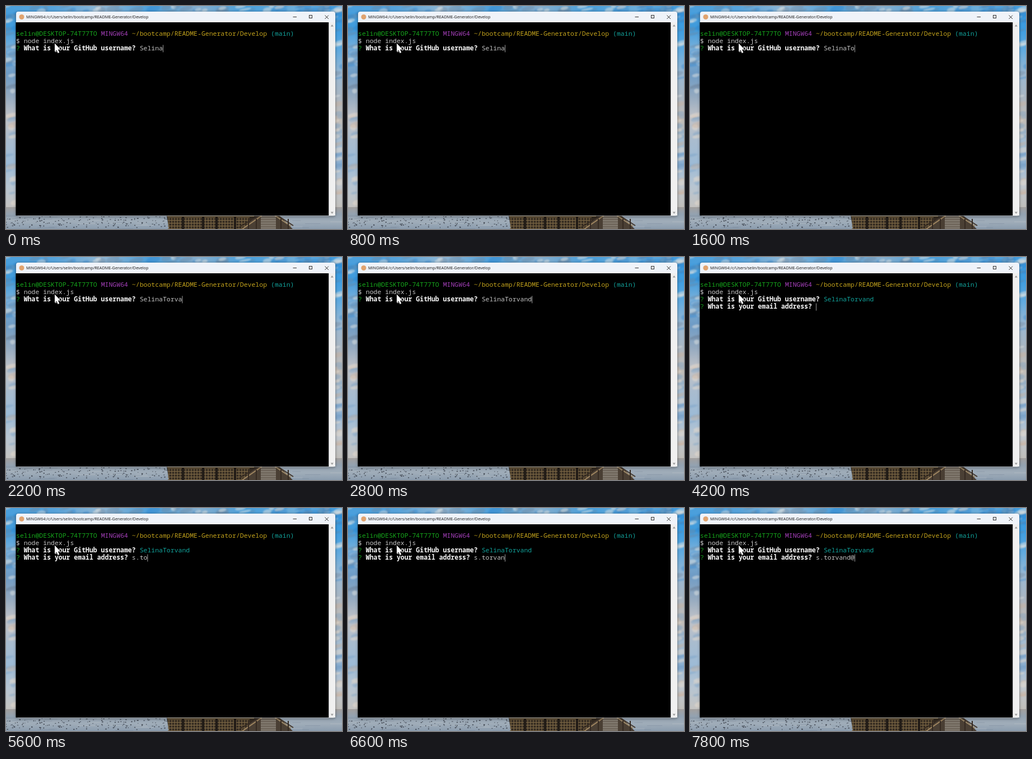
Write an HTML page with a canvas that moves like this. It is 600 by 397 pixels and loops after 8 s.

```html
<!DOCTYPE html>
<html lang="en">
<head>
<meta charset="utf-8">
<title>Terminal prompt</title>
<style>
  html, body { margin: 0; width: 100%; height: 100%; overflow: hidden; }
  canvas { display: block; }
</style>
</head>
<body>
<canvas id="stage" width="600" height="397"></canvas>
<script>
const ctx = document.getElementById('stage').getContext('2d');
const LOOP = 8000, STEP = 200;
const CELL = 6.895, LEFT = 18, BASELINE = 53, LINE = 13.15;
const GREEN = '#16a51c', PURPLE = '#a33fb8', YELLOW = '#c2a21c', CYAN = '#12a39c';
const GRAY = '#c4c4c4', WHITE = '#fafafa';

const USERNAME = 'SelinaTorvand', EMAIL = 's.torvand@';
const TYPED_BEFORE = 6;
const usernameKeys = [1000, 1400, 1800, 2000, 2200, 2400, 2600];
const ENTER = 3200;
const emailKeys = [4600, 4800, 5200, 5400, 5800, 6200, 6400, 6600, 7000, 7600];

let seed = 7;
function random() {
  seed = (seed * 16807) % 2147483647;
  return seed / 2147483647;
}

function rect(color, x, y, w, h) {
  ctx.fillStyle = color;
  ctx.fillRect(x, y, w, h);
}

function polygon(color, ...points) {
  ctx.fillStyle = color;
  ctx.beginPath();
  for (const [x, y] of points) ctx.lineTo(x, y);
  ctx.closePath();
  ctx.fill();
}

function line(color, width, ...points) {
  ctx.strokeStyle = color;
  ctx.lineWidth = width;
  ctx.beginPath();
  points.forEach(([x, y], i) => i ? ctx.lineTo(x, y) : ctx.moveTo(x, y));
  ctx.stroke();
}

function gradient(x0, y0, x1, y1, colors) {
  const g = ctx.createLinearGradient(x0, y0, x1, y1);
  colors.forEach((c, i) => g.addColorStop(i / (colors.length - 1), c));
  return g;
}

function drawSky() {
  rect(gradient(0, 0, 0, 360,
    ['#4a9fdc', '#3f9bdc', '#7fb2da', '#6f9cc6', '#93a9c0', '#c3c4c8', '#a9bccf', '#9dbbd6', '#b7c5d2', '#c5c3c0']), 0, 0, 300, 360);
  rect(gradient(0, 0, 0, 360,
    ['#3d9ade', '#3c9ce0', '#62abdf', '#9ab8d2', '#a9b6c3', '#c5bdb5', '#a5bdd2', '#9ab9d6', '#c1c8cf', '#c0beba']), 300, 0, 300, 360);
  rect(gradient(0, 0, 600, 0,
    ['#4a9fdc', '#55a2da', '#8fb6d4', '#4c9fda', '#86aecd', '#479edb', '#6badda', '#3d9ade']), 0, 0, 600, 11);

  const upper = ['rgba(226,228,226,.5)', 'rgba(40,130,205,.35)', 'rgba(110,130,152,.35)'];
  const lower = ['rgba(232,220,206,.5)', 'rgba(110,155,198,.35)', 'rgba(205,176,150,.35)'];
  ctx.save();
  ctx.filter = 'blur(1.2px)';
  for (let i = 0; i < 130; i++) {
    const side = Math.floor(random() * 3);
    const x = side === 0 ? random() * 18 : side === 1 ? 586 + random() * 14 : random() * 600;
    const y = side === 2 ? random() * 10 : random() * 352;
    ctx.fillStyle = (y > 170 ? lower : upper)[i % 3];
    ctx.beginPath();
    ctx.ellipse(x, y, 4 + random() * 9, 1.5 + random() * 4, -0.2, 0, 7);
    ctx.fill();
  }
  ctx.restore();
}

function drawShore() {
  rect(gradient(0, 358, 0, 397, ['#a3a09e', '#93a2b1', '#a0adb9', '#8b9cae']), 0, 358, 600, 39);
  for (let i = 0; i < 70; i++) {
    const tone = i % 2 ? 'rgba(205,207,208,.3)' : 'rgba(95,112,132,.25)';
    rect(tone, random() * 600 - 20, 362 + random() * 35, 10 + random() * 30, 1);
  }
  for (let i = 0; i < 150; i++) {
    rect('rgba(47,52,62,.8)', random() * 288, 374 + random() * 20, 1 + random() * 1.6, 0.8 + random());
  }
}

function drawPier() {
  polygon('#332a20', [287, 373], [450, 373], [436, 397], [291, 397]);
  for (let x = 290; x < 434; x += 5) rect('rgba(138,114,74,.5)', x, 377, 2, 20);
  for (let y = 376; y < 397; y += 5) rect('#786444', 289, y, 146, 1.3);
  for (const x of [314, 350, 374, 407]) rect('#221c17', x, 375, 4, 22);
  rect('#85724f', 288, 373, 155, 2);

  polygon('#4a3f34', [448, 373], [488, 373], [512, 397], [421, 397]);
  for (let y = 375; y < 397; y += 3) rect('#aaa59b', 455, y, 27, 1.4);
  line('#a08660', 2, [457, 373], [422, 397]);
  line('#352a22', 2, [451, 373], [416, 394]);
  line('#a08a68', 2, [480, 373], [509, 392]);
  line('#43372c', 2, [485, 373], [513, 391]);
  for (const x of [432, 446, 490, 503]) rect('#352a22', x, 379, 2, 18);
}

function drawWindow() {
  ctx.save();
  ctx.shadowColor = 'rgba(0,0,0,.45)';
  ctx.shadowBlur = 5;
  ctx.shadowOffsetY = 1;
  ctx.fillStyle = '#eff3f9';
  ctx.beginPath();
  ctx.roundRect(18, 10, 570, 363.5, 4);
  ctx.fill();
  ctx.restore();

  rect('#000', 17.5, 29, 559, 344);
  rect('#f0f0f0', 576.5, 29, 11.5, 344);
  polygon('#9a9a9a', [579.8, 36.5], [584.8, 36.5], [582.3, 33]);
  polygon('#9a9a9a', [579.8, 366.5], [584.8, 366.5], [582.3, 370]);

  ctx.fillStyle = '#e0a36f';
  ctx.beginPath();
  ctx.arc(28, 19.5, 4.5, 0, 7);
  ctx.fill();
  ctx.font = '7.25px "Open Sans", sans-serif';
  ctx.fillStyle = '#111';
  ctx.fillText('MINGW64:/c/Users/selin/bootcamp/README-Generator/Develop', 36, 22.3);

  line('#333', 1, [512.5, 19.5], [519, 19.5]);
  ctx.strokeRect(541.5, 16.5, 5, 5);
  line('#333', 1, [569.5, 16.5], [576, 23]);
  line('#333', 1, [576, 16.5], [569.5, 23]);
}

function write(row, col, text, color, weight = 400) {
  ctx.font = `${weight} ${CELL / 0.6}px "Noto Sans Mono", monospace`;
  ctx.fillStyle = color;
  ctx.fillText(text, LEFT + col * CELL, BASELINE + row * LINE);
}

function ask(row, question) {
  write(row, 0, '?', GREEN);
  write(row, 2, question, WHITE, 600);
}

function drawPointer() {
  const shape = [[87, 66.5], [87, 81.5], [90.3, 78.5], [92.7, 84], [95.3, 82.8], [93, 77.5], [97.3, 77.2]];
  line('#000', 1.6, ...shape, shape[0]);
  polygon('#fff', ...shape);
}

const pressed = (keys, t) => keys.filter(k => k <= t).length;

function drawTerminal(t) {
  rect('#000', 18, 38, 558, 62);
  write(0, 0, 'selin@DESKTOP-74T77TO', GREEN);
  write(0, 22, 'MINGW64', PURPLE);
  write(0, 30, '~/bootcamp/README-Generator/Develop', YELLOW);
  write(0, 66, '(main)', CYAN);
  write(1, 0, '$ node index.js', GRAY);

  const answered = t >= ENTER;
  const username = USERNAME.slice(0, TYPED_BEFORE + pressed(usernameKeys, t));
  ask(2, 'What is your GitHub username?');
  write(2, 32, username, answered ? CYAN : GRAY);
  let row = 2, caret = 32 + username.length;

  if (answered) {
    const email = EMAIL.slice(0, pressed(emailKeys, t));
    ask(3, 'What is your email address?');
    write(3, 30, email, GRAY);
    row = 3;
    caret = 30 + email.length;
  }

  const blinkOff = t % 1000 === 400;
  if (!blinkOff) rect('#b0b0b0', LEFT + caret * CELL, BASELINE + row * LINE - 10, 0.9, 13);
  drawPointer();
}

function frame(now) {
  drawTerminal(Math.floor((now % LOOP) / STEP) * STEP);
  requestAnimationFrame(frame);
}

drawSky();
drawShore();
drawPier();
drawWindow();
requestAnimationFrame(frame);
</script>
</body>
</html>
```
